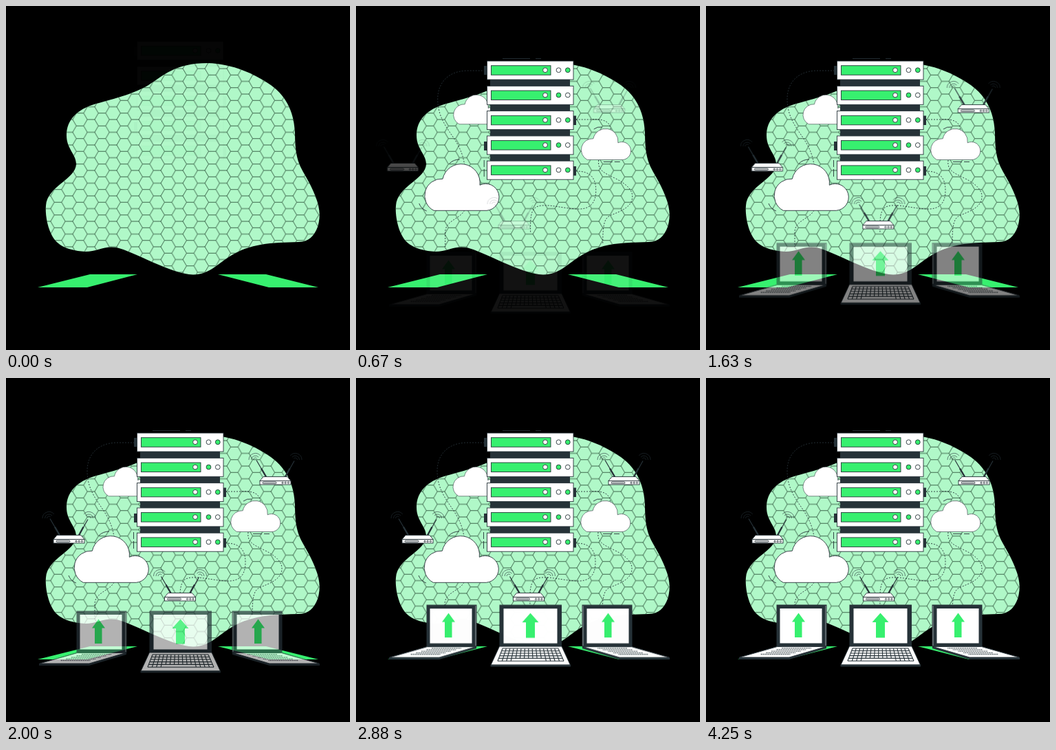
An HTML page that plays this animation: 500x500 px, repeating every 4290 ms.

```html
<!DOCTYPE html>
<html lang="en">
<head>
<meta charset="utf-8">
<title>Cloud hosting</title>
<style>
html, body { margin: 0; width: 100%; height: 100%; overflow: hidden; background: #000; }
svg { display: block; width: 100vw; height: 100vh; }
.line { fill: none; stroke: #263238; stroke-width: .9; }
.dash { stroke-dasharray: 2 2; }
.white { fill: #fff; stroke: #263238; stroke-width: .9; }
.green { fill: #37f06f; }
.dark { fill: #263238; }
</style>
</head>
<body>
<svg viewBox="0 0 500 500">
  <defs>
    <pattern id="hex" width="32.04" height="18.5" patternUnits="userSpaceOnUse" patternTransform="translate(118.2 183.500)">
      <path d="M0 0H10.68L16.02 9.25H26.7L32.04 0M10.68 18.5L16.02 9.25M26.7 9.25L32.04 18.5M0 18.5H10.68" fill="none" stroke="#0c2a18" stroke-width=".7"/>
    </pattern>
    <path id="blob" d="M293 83C330 84 362 99 385 115C410 133 419 158 420 185C420 235 432 235 447 270C456 290 458 305 453 321C448 334 440 343 425 343C385 344 355 345 325 364C305 377 295 390 272 390.5C240 390 185 356 160 351C143 348 133 357 115 357C85 355 72 345 66 332C59 318 57 300 58 290C60 262 101 252 102 230C102 215 88 208 88 188C88 165 104 152 122 145C145 137 180 131 207 115C228 102 245 83 293 83Z"/>
    <path id="cloud" class="white" d="M19 69A24.4 24.4 0 0 1 32 23A27.4 27.4 0 0 1 86 32A19.5 19.5 0 1 1 96 69Z"/>
    <g id="router">
      <path class="line" style="stroke-width:1.200" d="M9 0L-5 -24M37 0L50 -23"/>
      <path class="line" style="stroke-width:2.400" d="M9 0L2 -12M37 0L43.5 -12"/>
      <path id="wifi" class="line" style="stroke-width:.6" d="M-9.500 -24.500A3 3 0 0 1 -4.200 -26.400M-12.500 -24.500A6 6 0 0 1 -1.900 -28.400M-16 -24.500A9.500 9.500 0 0 1 .8 -30.600"/>
      <use href="#wifi" transform="matrix(-1 0 0 1 45 0)"/>
      <path class="white" d="M5 0H40L45 6H0Z"/>
      <rect class="white" y="6" width="45" height="5.500"/>
      <rect class="white" x="4" y="7.700" width="20" height="2.200" rx="1.100"/>
      <g class="white"><circle cx="33" cy="8.800" r="1.100"/><circle cx="37.200" cy="8.800" r="1.100"/><circle cx="41.400" cy="8.800" r="1.100"/></g>
    </g>
    <g id="side">
      <rect class="dark" x="102.500" y="329.500" width="73" height="61"/>
      <path d="M174 331V389" stroke="#aeb4b7" stroke-width=".8"/>
      <rect x="107.500" y="335" width="61" height="50.500" fill="#fff"/>
      <path class="dark" d="M48 406L103 390H175V393L121 409H48Z"/>
      <path class="white" d="M49 406L103.500 390.500H174L121 406Z"/>
      <g id="sideKeys" stroke="#70797d" stroke-width="1.300" stroke-dasharray="2.600 .6"></g>
    </g>
  </defs>

  <use href="#blob" fill="#b0f8c8"/>
  <use href="#blob" fill="url(#hex)"/>
  <path class="green" d="M46 409L122 390H191L118 409ZM308 390H378L454 409H382Z"/>

  <g id="clouds">
    <g class="line dash">
      <path d="M187 94H160C130 95 118 115 118 135C118 160 130 175 140 190C153 209 155 220 157 230M157 297C150 310 128 312 129 330V350"/>
      <path d="M319 165H340C366 163 372 172 369 190M352 224C350 240 362 243 375 250C392 258 402 268 401 278C400 292 385 298 370 304C360 308 358 318 358 345"/>
      <path d="M319 240C340 240 348 250 348 268C348 288 338 296 320 295C300 294 285 289 270 290C255 291 252 300 253 330"/>
    </g>
    <path class="line" d="M135 229Q141 223 150 223M91 287Q94 295 102 298M345 179Q350 175 357 176M359 226.500H372M375 226.500H383M185.500 224V234M185.500 237V248"/>
    <use href="#cloud" transform="translate(137.300 128.300) scale(.63)"/>
    <use href="#cloud" transform="translate(93.300 228.300)"/>
    <use href="#cloud" transform="translate(322.800 177.500) scale(.667)"/>
  </g>

  <g id="server">
    <path class="line" d="M213 76.500H253M261 76.500H269"/>
    <rect class="dark" x="195" y="95" width="116" height="140"/>
    <path class="dark" d="M186 87H191V100H186ZM186 197H191V210H186ZM315 159.500H320V173H315ZM315 233H320V246.500H315Z"/>
    <g id="units"></g>
  </g>

  <g id="routers">
    <use href="#router" x="67" y="228.500"/>
    <use href="#router" x="228.500" y="312.500"/>
    <use href="#router" x="367" y="143.500"/>
  </g>

  <g id="laptops">
    <use href="#side"/>
    <use href="#side" transform="matrix(-1 0 0 1 504 0)"/>
    <rect class="dark" x="208.500" y="329.500" width="90.500" height="61"/>
    <rect x="214.500" y="335" width="78" height="50.500" fill="#fff"/>
    <path class="white" d="M208.500 390H299L311.500 417H196Z"/>
    <path class="dark" d="M195.500 416.500H312V419.500H195.500Z"/>
    <path id="keys" class="line" style="stroke-width:1.100"/>
    <path class="green" d="M253.500 341.500L265.500 355H260V377.500H247V355H241.500ZM134.500 341.500L144 354.500H139.500V377H129V354.500H125ZM366.500 341.500L376 354.500H371.500V377H361V354.500H357Z"/>
  </g>
</svg>
<script>
const LOOP = 4290;
const $ = id => document.getElementById(id);

// Server units: the two lamps swap colours on every other row.
const lamp = (x, on) => `<circle class="white" cx="${x}" cy="13.200" r="3.400" style="fill:${on ? '#37f06f' : '#fff'}"/>`;
$('units').innerHTML = [0, 1, 2, 3, 4].map(i => `
  <g transform="translate(190.500 ${80 + i * 36.3})">
    <rect class="white" width="125.500" height="27"/>
    <rect class="white" x="6" y="6.700" width="86.500" height="13.500" style="fill:#37f06f"/>
    ${lamp(84.5, false)}${lamp(104, i % 2)}${lamp(117.3, i % 2 === 0)}
  </g>`).join('');

$('sideKeys').innerHTML = [0, 1, 2, 3, 4].map(i => {
  const x = 110 - i * 7.6, y = 392.7 + i * 2.2;
  return `<path d="M${x} ${y}H${x + 43}"/>`;
}).join('');

// Keyboard grid in perspective; the last row holds the space bar.
const left = y => 213 - (y - 393) * .39;
const right = y => 294 + (y - 393) * .44;
const rowY = i => 393 + i * 3.4 + i * i * .05;
let grid = '';
for (let i = 0; i <= 5; i++) {
  const y = rowY(i);
  grid += `M${left(y)} ${y}H${right(y)}`;
  if (i === 5) break;
  const y2 = rowY(i + 1);
  for (let k = 0; k <= 15; k++) {
    if (i === 4 && k > 3 && k < 11) continue;
    const at = v => left(v) + (right(v) - left(v)) * k / 15;
    grid += `M${at(y)} ${y}L${at(y2)} ${y2}`;
  }
}
$('keys').setAttribute('d', grid);

// Soft start, overshoot, settle: smooth curve through [time, progress] knots.
const knots = [[0, 0], [.045, .07], [.21, .33], [.4, .7], [.53, .87], [.66, 1.02], [.755, 1.07], [.86, 1.04], [1, 1]];
const slope = i => {
  const a = knots[Math.max(0, i - 1)], b = knots[Math.min(knots.length - 1, i + 1)];
  return i === knots.length - 1 ? 0 : (b[1] - a[1]) / (b[0] - a[0]);
};
function ease(u) {
  if (u <= 0) return 0;
  if (u >= 1) return 1;
  const i = knots.findIndex(k => k[0] > u) - 1;
  const [x0, y0] = knots[i], [x1, y1] = knots[i + 1];
  const h = x1 - x0, s = (u - x0) / h, r = 1 - s;
  return r * r * (1 + 2 * s) * y0 + s * s * (3 - 2 * s) * y1
    + h * s * r * (r * slope(i) - s * slope(i + 1));
}

// id, start, duration, starting offset x and y
const entries = [
  ['server', -7, 560, 0, -29],
  ['clouds', 100, 860, -30, 0],
  ['routers', 270, 2200, -30, 0],
  ['laptops', 500, 3750, 0, 30]
];

function draw(now) {
  const t = now % LOOP;
  for (const [id, start, duration, dx, dy] of entries) {
    const p = ease((t - start) / duration);
    $(id).setAttribute('transform', `translate(${dx * (1 - p)} ${dy * (1 - p)})`);
    $(id).setAttribute('opacity', Math.min(1, p));
  }
}

const begin = performance.now();
function tick() {
  draw(performance.now() - begin);
  requestAnimationFrame(tick);
}
tick();
</script>
</body>
</html>
```
